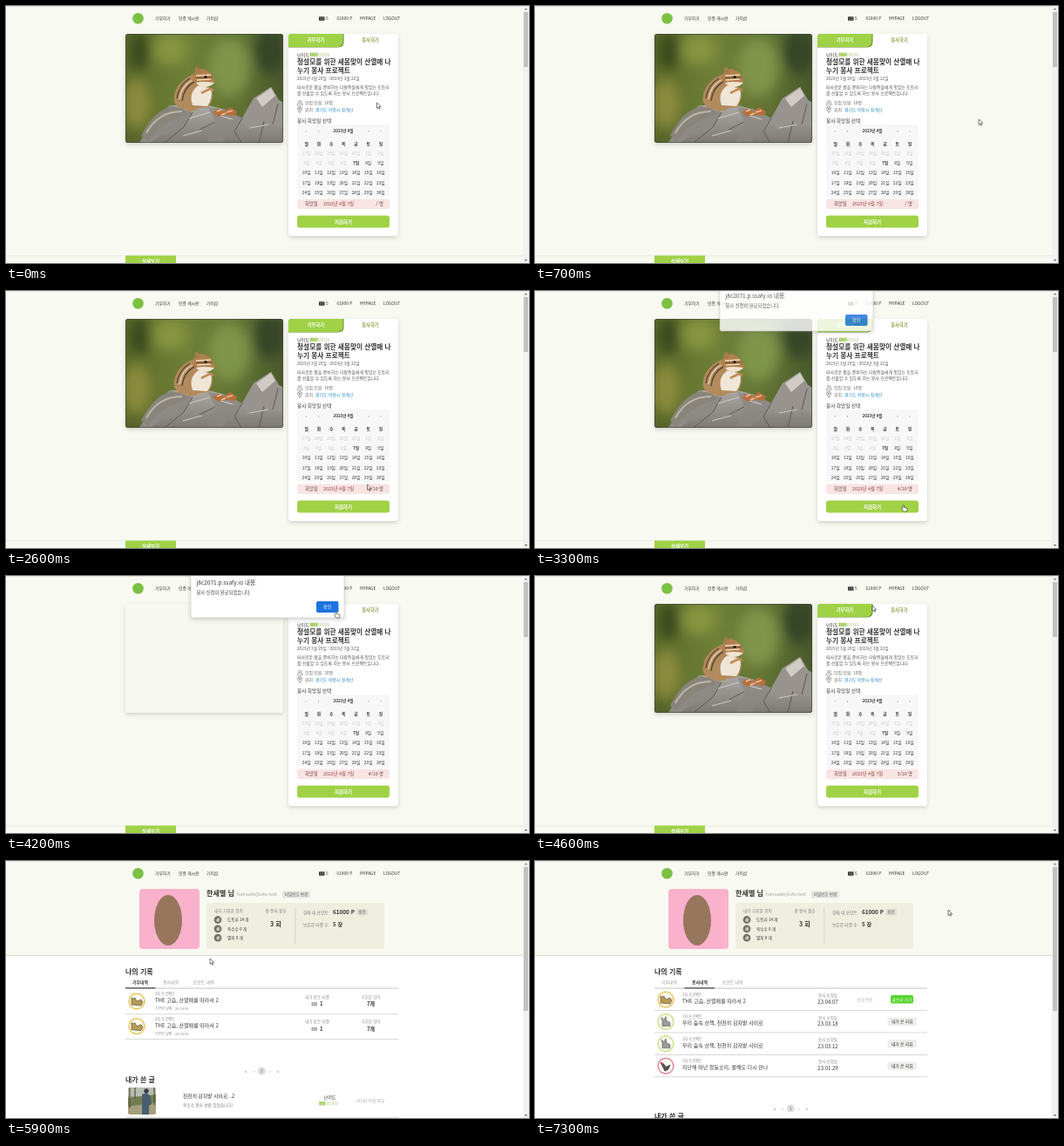
These frames come from a looping animation (600x295 px, 7400 ms). An HTML page:

```html
<!DOCTYPE html>
<html lang="ko">
<head>
<meta charset="utf-8">
<title>봉사 신청</title>
<style>
html, body { margin: 0; width: 100%; height: 100%; overflow: hidden; background: #f8f9f0; }
svg { display: block; width: 100vw; height: 100vh; font-family: "Noto Sans CJK KR", "Noto Sans CJK", sans-serif; }
.hide { display: none; }
</style>
</head>
<body>
<svg id="stage" viewBox="0 0 600 295">
  <defs>
    <filter id="shadow" x="-20%" y="-20%" width="140%" height="150%"><feDropShadow dx="0" dy="2" stdDeviation="2.6" flood-color="#666" flood-opacity=".27"/></filter>
    <filter id="soft" x="-60%" y="-60%" width="220%" height="220%"><feGaussianBlur stdDeviation="7"/></filter>
    <filter id="fur"><feGaussianBlur stdDeviation=".45"/></filter>
    <linearGradient id="leaf"><stop offset="0" stop-color="#5b6a29"/><stop offset=".4" stop-color="#6f8038"/><stop offset=".75" stop-color="#5f7033"/><stop offset="1" stop-color="#4a5a2d"/></linearGradient>
    <linearGradient id="rock" x2="0" y2="1"><stop offset="0" stop-color="#c2beb8"/><stop offset=".5" stop-color="#a09c97"/><stop offset="1" stop-color="#7d7975"/></linearGradient>
    <clipPath id="photoClip"><rect x="137" y="32" width="181" height="125" rx="3"/></clipPath>
    <clipPath id="thumbClip"><rect x="140" y="260" width="32" height="31" rx="2.5"/></clipPath>
  </defs>
  <rect width="600" height="295" fill="#f8f9f0"/>
  <g id="project">
    <rect x="137" y="32" width="181" height="125" rx="3" fill="#f7f8ef" filter="url(#shadow)"/>
    <g id="photo" clip-path="url(#photoClip)">
      <rect x="137" y="32" width="181" height="125" fill="url(#leaf)"/>
      <g filter="url(#soft)">
        <ellipse cx="153" cy="52" rx="12" ry="22" fill="#3b4a1c"/>
        <ellipse cx="188" cy="50" rx="20" ry="18" fill="#87943f"/>
        <ellipse cx="150" cy="112" rx="16" ry="28" fill="#8b8b3c"/>
        <ellipse cx="256" cy="70" rx="24" ry="34" fill="#7f9448"/>
        <ellipse cx="303" cy="52" rx="18" ry="26" fill="#354525"/>
        <ellipse cx="145" cy="154" rx="14" ry="9" fill="#55602a"/>
      </g>
      <path d="M153 157 163 141 176 126 188 114 232 114 252 119 271 129 284 106 304 93 313 108 318 111V157Z" fill="url(#rock)"/>
      <path d="M284 106 304 93 313 108 318 111V140L296 132 277 142 271 129Z" fill="#98938f"/>
      <path d="M287 106 304 94 309 103 294 116Z" fill="#d0cbc5"/>
      <path d="M188 114 214 122 204 138 179 148 166 157H153L163 141Z" fill="#8d8984"/>
      <path d="M232 116 241 134 230 157H247L263 140 271 129 252 119Z" fill="#8a8682" opacity=".7"/>
      <path d="M214 122 204 139 182 157M240 133 222 142M271 129 262 144 270 157M296 132 290 157M312 112 306 136" fill="none" stroke="#5d5955" stroke-width="1"/>
      <path d="M210 129 234 122M203 149 225 143M246 126 260 130M280 140 301 136" fill="none" stroke="#cbc7c1" stroke-width="1.2"/>
      <g filter="url(#fur)">
        <path d="M203 118C181 110 166 128 155 149L163 155C171 142 185 131 208 124Z" fill="#88847a"/>
        <path d="M161 146C170 129 184 121 202 121" fill="none" stroke="#bcb6a8" stroke-width="2"/>
        <path d="M217 78C202 82 191 96 193 110Q196 119 210 119L232 116Q239 107 236 95L228 90Z" fill="#b18a5d"/>
        <path d="M221 91Q209 99 214 114L231 115Q238 105 235 95Z" fill="#efe6d7"/>
        <path d="M211 83Q198 91 196 106M216 87Q204 93 202 109" fill="none" stroke="#594532" stroke-width="1.4"/>
        <path d="M213.5 85Q201 92 199 107" fill="none" stroke="#e5d3b2" stroke-width="1.3"/>
        <path d="M214 83Q215 74 224 72 235 73 240 86 238 91 230 92 217 94 214 83Z" fill="#b1804f"/>
        <path d="M218 88Q226 86 239 88 236 92 229 93 221 93 218 88Z" fill="#f0e4d2"/>
        <path d="M218 80 235 79M219 85 235 84" stroke="#eed9b7" stroke-width="1.4"/>
        <path d="M218 82.5 237 82" stroke="#654a32" stroke-width="1.1"/>
        <ellipse cx="219" cy="74" rx="2.5" ry="4" fill="#a57a50"/>
        <path d="M224 100 234 95 238 97" fill="none" stroke="#c08c59" stroke-width="2.7"/>
        <path d="M203 117Q213 110 220 119L211 121Z" fill="#b38a5a"/>
      </g>
      <circle cx="229" cy="81.5" r="1.5" fill="#17130f"/>
      <path d="M237 122 243 118 250 121 257 116 265 121 263 126 252 125 243 127Z" fill="#b66f3e"/>
      <path d="M242 121 247 119M253 122 260 120M247 125 252 123" stroke="#efc49a" stroke-width="1.5"/>
      <rect x="137.3" y="32.3" width="180.4" height="124.4" rx="3" fill="none" stroke="#3e4234" stroke-width=".8"/>
    </g>
  </g>
  <g id="mypage" class="hide"></g>
  <g id="nav"></g>
  <g id="dialog" class="hide"></g>
  <g id="arrow"><path d="M0 0V6.4L1.5 5.1 2.5 7.3 3.5 6.9 2.5 4.7H4.6Z" fill="#fff" stroke="#222" stroke-width=".6"/></g>
  <g id="hand"><path d="M0 .5Q.8-.3 1.5.6V3L4.6 3.8Q5.3 4.1 5 5.5L4.5 7.5H.7L-1.4 4.7Q-1 3.5 0 4Z" fill="#fff" stroke="#222" stroke-width=".6"/></g>
</svg>
<script>
const $ = id => document.getElementById(id);
const GREEN = '#9fd246', INK = '#333', GRAY = '#8b8b88';
let layer;

function add(tag, attrs, parent = layer) {
  const node = document.createElementNS('http://www.w3.org/2000/svg', tag);
  for (const key in attrs) node.setAttribute(key, attrs[key]);
  return parent.appendChild(node);
}
function group(id, parent = layer) {
  return layer = add('g', { id }, parent);
}
// y is the vertical middle of the text
function text(x, y, size, value, fill = INK, weight = 400, anchor = 'start') {
  const node = add('text', { x, y: y + size * .37, 'font-size': size, fill, 'font-weight': weight, 'text-anchor': anchor });
  node.textContent = value;
  return node;
}
const mid = (x, y, size, value, fill, weight) => text(x, y, size, value, fill, weight, 'middle');
const box = (x, y, width, height, fill, rx = 0) => add('rect', { x, y, width, height, fill, rx });
const dot = (cx, cy, r, fill) => add('circle', { cx, cy, r, fill });
const path = (d, fill, stroke = 'none', width = 1) => add('path', { d, fill, stroke, 'stroke-width': width });
const rule = (y, color = '#c9c9c6', x = 137, width = 313) => box(x, y, width, .7, color);

function ticket(x, y, color) {
  box(x, y, 6.5, 4.4, color, .7);
  path(`M${x + 2} ${y + .5}v3.4M${x + 4.5} ${y + .5}v3.4`, 'none', '#f8f9f0', .4);
}
function bars(x, y, filled) {
  for (let i = 0; i < 10; i++) box(x + i * 2.25, y, 1.6, 4.5, i < filled ? '#8cc63a' : '#dfe6cc', .4);
}
function pager(y) {
  ['«', '‹', '1', '›', '»'].forEach((mark, i) => {
    if (i === 2) dot(293.3, y, 4.6, '#dedede');
    mid(275 + i * 9.2, y, 5, mark, '#666');
  });
}
function scrollbar(bottom) {
  box(593, 0, 7, 295, '#f1f1f1');
  box(594, 7, 5, bottom - 7, '#c1c1c1');
  path('M594.8 4.3 596.5 2.4 598.2 4.3ZM594.8 291 596.5 293 598.2 291Z', '#666');
}
function badge(y, kind) {
  const ring = { gold: '#e0b735', lime: '#b9dc6e', pink: '#dc6980' }[kind];
  add('circle', { cx: 150, cy: y, r: 8.8, fill: '#fffdf5', stroke: ring, 'stroke-width': 1.5, 'stroke-dasharray': '1.8 .5' });
  if (kind === 'gold') {
    path(`M144 ${y + 4}v-8l2 1 2-1 2 4 5-2 2 3-2 4Z`, '#b79a55', '#4f4631', .6);
  } else if (kind === 'lime') {
    path(`M146 ${y + 5}v-6l-1-4 3 3 2-4 1 5 4 2v4Z`, '#999e96', '#555', .6);
  } else {
    path(`M144 ${y - 4}l4 2 2 3 5-2-2 5-4 2-2-4Z`, '#555', '#333', .6);
    dot(146, y - 3, 1, '#d45063');
  }
}

function buildProject() {
  layer = $('project');
  add('rect', { x: 324, y: 32, width: 126, height: 232, rx: 4, fill: '#fff', filter: 'url(#shadow)' });
  path('M328 32H387.5V41Q387.5 47.5 381 47.5H324V36Q324 32 328 32Z', '#6d8c30');
  path('M328 32H386.5V40.5Q386.5 47 380 47H324V36Q324 32 328 32Z', GREEN);
  mid(355.5, 39.5, 5.3, '기부하기', '#fff', 700);
  mid(418, 39.5, 5.3, '봉사하기', '#91a34c', 700);
  text(334, 56, 5, '난이도');
  bars(349, 53.5, 4);
  text(334, 64, 7.7, '청설모를 위한 새봄맞이 산열매 나', INK, 700);
  text(334, 74, 7.7, '누기 봉사 프로젝트', INK, 700);
  text(334, 83.3, 4.7, '2023년 3월 29일 ~2023년 3월 22일', '#555');
  text(334, 93.5, 4.9, '따사로운 봄을 준비하는 다람쥐들에게 맛있는 도토리', '#555');
  text(334, 100.5, 4.9, '를 선물할 수 있도록 하는 봉사 프로젝트입니다.', '#555');
  path('M334 114q0-3 2.5-3t2.5 3ZM335.3 109.5a1.2 1.2 0 1 0 2.4 0a1.2 1.2 0 1 0-2.4 0M338 108.5q2 .4 1 2.4 1.6.7 1.5 3', 'none', '#666', .5);
  text(343, 111, 4.9, '모집 인원\u00a0\u00a010명', '#666');
  path('M337 122.5q-5-6.8 0-6.8t0 6.8ZM336.2 118a.8.8 0 1 0 1.6 0a.8.8 0 1 0-1.6 0', 'none', '#555', .6);
  text(343, 118.7, 4.9, '위치 :', '#666');
  text(355, 118.7, 4.9, '경기도 의왕시 청계산', '#258ac4');
  text(334, 132, 5.6, '봉사 희망일 선택');

  box(334, 136, 106, 83.5, '#f7f7f7', 2);
  [[344.5, '«', '#aaa'], [358.5, '‹', INK], [416, '›', '#a33'], [430, '»', '#aaa']].forEach(([x, mark, fill]) => mid(x, 143, 5, mark, fill));
  mid(387, 143, 4.5, '2023년 4월', INK, 700);
  [...'월화수목금토일'].forEach((day, i) => mid(344.7 + i * 14.2, 158.3, 4.8, day, INK, 700));
  for (let i = 0; i < 35; i++) {
    const day = i < 5 ? 27 + i : i - 4;
    const fill = i < 11 ? '#c9c9c9' : INK;
    mid(344.7 + i % 7 * 14.2, 169 + Math.floor(i / 7) * 11.25, 4.8, day + '일', fill, i === 11 ? 700 : 400);
  }
  box(334, 221.5, 106, 11.5, '#f9e4e4', 2);
  text(343, 227.3, 5.3, '희망일', '#6c3a3a');
  text(364, 227.3, 5.3, '2023년 4월 7일', '#923c3c');
  text(433, 227.3, 5.3, '/ 명', '#6c3a3a', 400, 'end').id = 'count';
  box(334, 240.5, 106, 14, GREEN, 3);
  mid(387, 247.5, 5.5, '지원하기', '#fff', 700);
  rule(286.5, '#dfe1d8', 0, 593);
  box(137, 286.5, 58, 9, GREEN);
  mid(166, 293, 5.5, '상세보기', '#fff', 700);
  scrollbar(70);
}

function buildProfile(page) {
  box(0, 108, 593, 187, '#fff');
  rule(108, '#c9cac4', 0, 593);
  scrollbar(172);
  box(153, 32, 69, 69, '#f9b1cc', 4);
  add('ellipse', { cx: 186, cy: 68, rx: 16, ry: 29, fill: '#98765e' });
  text(230, 37.5, 8.1, '한새별 님', INK, 700);
  text(265, 38.5, 5.3, 'hansaeb@site.test', '#a1a19e');
  box(317, 34.5, 32, 8, '#e4e5de', 2);
  mid(333, 38.5, 4.6, '비밀번호 변경', '#666');
  box(230, 48, 204, 53, '#efefe0', 3);
  text(239, 57.5, 4.7, '내가 기부한 모이', '#777');
  ['도토리 14 개', '옥수수 0 개', '멸치 0 개'].forEach((label, i) => {
    const y = 67.5 + i * 10.3;
    dot(243, y, 4.4, '#74746a');
    path(`M241 ${y + 1}q1-4 4-2.5 1 3-2 4Z`, '#c9c9bc');
    text(254, y, 4.6, label);
  });
  mid(309.5, 57.5, 4.7, '총 봉사 횟수', '#777');
  mid(309.5, 72.5, 7.2, '3 회', INK, 700);
  box(331.5, 54, .7, 41, '#c9c9bd');
  text(341, 59, 4.7, '현재 내 포인트', '#777');
  text(375, 58.5, 6.4, '61000 P', INK, 700);
  box(402, 55, 13, 7.5, '#deded2', 2);
  mid(408.5, 58.7, 4.5, '충전', '#666');
  text(341, 73, 4.7, '보유한 티켓 수', '#777');
  text(375, 72.5, 6.2, '5 장', INK, 700);
  text(137, 127, 8, '나의 기록', INK, 700);
  rule(145.7, '#aaa');
  group('donations', page);
  buildDonations();
  group('services', page);
  buildServices();
}

function tabs(active) {
  [['기부내역', 154], ['봉사내역', 189], ['포인트 내역', 226.5]].forEach(([label, x], i) =>
    mid(x, 139, 4.9, label, i === active ? INK : '#999', i === active ? 700 : 400));
  box(137 + active * 34.5, 145.2, 34.5, 1.3, '#555');
}

function buildDonations() {
  tabs(0);
  [0, 28.7].forEach(dy => {
    badge(161 + dy, 'gold');
    text(171, 152.7 + dy, 4.2, '2차 프로젝트', GRAY);
    text(171, 160 + dy, 6, 'THE 고슴, 산열매를 따라서 2');
    text(171, 169.7 + dy, 4, '기부한 날짜 : 23.04.06', GRAY);
    mid(357, 156 + dy, 4.5, '내가 받은 티켓', GRAY);
    ticket(350.5, 162 + dy, '#aaa');
    text(360, 164 + dy, 6, '1', INK, 700);
    mid(418.5, 156 + dy, 4.5, '기부한 모이', GRAY);
    mid(418.5, 164 + dy, 6, '7개', INK, 700);
    rule(175.5 + dy);
  });
  pager(241);
  text(137, 251.5, 8, '내가 쓴 글', INK, 700);
  const thumb = add('g', { 'clip-path': 'url(#thumbClip)' });
  const home = layer;
  layer = thumb;
  box(140, 260, 32, 31, '#a69f7e');
  box(140, 260, 32, 10, '#b8beb2');
  path('M140 272 172 268V277L140 282Z', '#727e4e');
  path('M142 260V284M148 260V273M170 260V280', 'none', '#5b5b4b', 1.3);
  dot(161, 264, 2.7, '#353e47');
  path('M156 268Q161 265 165 269L167 279 164 281V291H156V280Z', '#465e70');
  layer = home;
  text(203, 270, 5.8, '천천히 감자밭 사이로...2');
  text(203, 280, 4.7, '옥수수 봉사 보람 있었습니다!', '#777');
  mid(371.5, 271, 5.1, '난이도');
  bars(359.5, 276, 3);
  text(434, 275, 4.2, '2023년 04월 06일', '#aaa', 400, 'end');
  rule(293.8);
}

function buildServices() {
  tabs(1);
  const rows = [
    ['gold', '2차', 'THE 고슴, 산열매를 따라서 2', '23.04.07'],
    ['lime', '1차', '우리 숲속 산책, 천천히 감자밭 사이로', '23.03.18'],
    ['lime', '1차', '우리 숲속 산책, 천천히 감자밭 사이로', '23.03.12'],
    ['pink', '1차', '지난해 떠난 청둥오리, 올해도 다시 만나', '23.01.29']
  ];
  rows.forEach(([kind, round, title, date], i) => {
    const y = 159 + i * 25.4;
    badge(y, kind);
    text(169, y - 5.5, 4.2, round + ' 프로젝트', GRAY);
    text(169, y + 1.6, 6, title);
    mid(336, y - 4.5, 4.5, '봉사 신청일', GRAY);
    mid(336, y + 2.8, 6, date, INK, 500);
    if (i) {
      box(404.5, y - 4.8, 33.5, 9.6, '#eeeeec', 2);
      mid(421.3, y, 4.8, '내가 쓴 리뷰');
    } else {
      mid(378.5, y, 4.5, '신청 완료', '#aaa');
      box(408, y - 5, 26, 9.6, '#55d52c', 2);
      mid(421, y - .2, 4.7, '글쓰러 가기', '#fff');
    }
    rule(y + 12.2);
  });
  pager(284);
  text(137, 293.5, 8, '내가 쓴 글', INK, 700);
}

function buildNav() {
  layer = $('nav');
  rule(0, '#d9dad4', 0, 593);
  dot(151.5, 14.3, 6.3, '#7bc143');
  [[171, '기부하기'], [198, '인증 게시판'], [230, '가이샵'], [367, '5'], [379.5, '61000 P'], [433, 'LOGOUT']]
    .forEach(([x, label]) => text(x, 14.3, 4.8, label));
  ticket(359, 12.3, '#333');
  text(406, 14.3, 4.8, 'MYPAGE').id = 'myLink';
}

function buildDialog() {
  layer = $('dialog');
  add('rect', { x: 212, y: -4, width: 176, height: 52, rx: 2, fill: '#fff', stroke: '#bbb', 'stroke-width': .5, filter: 'url(#shadow)' });
  text(218.5, 8, 6.5, 'j8c2071.p.ssafy.io 내용:');
  text(218.5, 19, 5.3, '봉사 신청이 완료되었습니다.', '#444');
  box(356, 29, 25.5, 13, '#1d73df', 2);
  mid(368.7, 35.3, 5, '확인', '#fff');
}

// time, x, y
const route = [
  [0, 425.5, 111], [100, 425.5, 111], [600, 509, 130], [1100, 509, 130], [1700, 388, 178],
  [1900, 401, 179], [2300, 401, 179], [2800, 422, 245.5], [3400, 422, 245.5], [4000, 378, 40.5],
  [4400, 378, 40.5], [5000, 413, 15.5], [5400, 413, 15.5], [5900, 234, 112], [6200, 189, 138],
  [6400, 189, 138], [6900, 421, 157], [7200, 421, 157], [7300, 474, 56], [7400, 474, 56]
];
const handTimes = [[1900, 2400], [2700, 3500], [4000, 4500], [5000, 5500], [6200, 6500], [6800, 7300]];
const within = (t, from, to) => t >= from && t < to;
const show = (id, on) => $(id).classList.toggle('hide', !on);

function pointer(t) {
  const i = route.findIndex(stop => stop[0] > t);
  const [t0, x0, y0] = route[i - 1], [t1, x1, y1] = route[i];
  const p = (t - t0) / (t1 - t0), eased = p * p * (3 - 2 * p);
  return [x0 + (x1 - x0) * eased, y0 + (y1 - y0) * eased];
}

function draw(t) {
  const profile = t >= 5500, service = t >= 6300;
  show('project', !profile);
  show('mypage', profile);
  show('donations', !service);
  show('services', service);
  show('photo', !within(t, 3400, 4400));
  show('dialog', within(t, 3300, 4400));
  $('dialog').setAttribute('opacity', t < 3400 ? .82 : 1);
  $('dialog').setAttribute('transform', `translate(0 ${t < 3400 ? -2 : 0})`);
  $('count').textContent = t < 2100 ? '/ 명' : t < 4400 ? '4/10 명' : '5/10 명';
  $('myLink').setAttribute('fill', within(t, 5000, 5500) ? '#e33b3b' : INK);
  const hand = handTimes.some(([from, to]) => within(t, from, to));
  show('hand', hand);
  show('arrow', !hand);
  $(hand ? 'hand' : 'arrow').setAttribute('transform', `translate(${pointer(t)})`);
}

buildProject();
layer = $('mypage');
buildProfile(layer);
buildNav();
buildDialog();

const start = performance.now();
function tick() {
  const elapsed = (performance.now() - start) % 7400;
  draw(Math.floor(elapsed / 100) * 100);
  requestAnimationFrame(tick);
}
tick();
</script>
</body>
</html>
```
